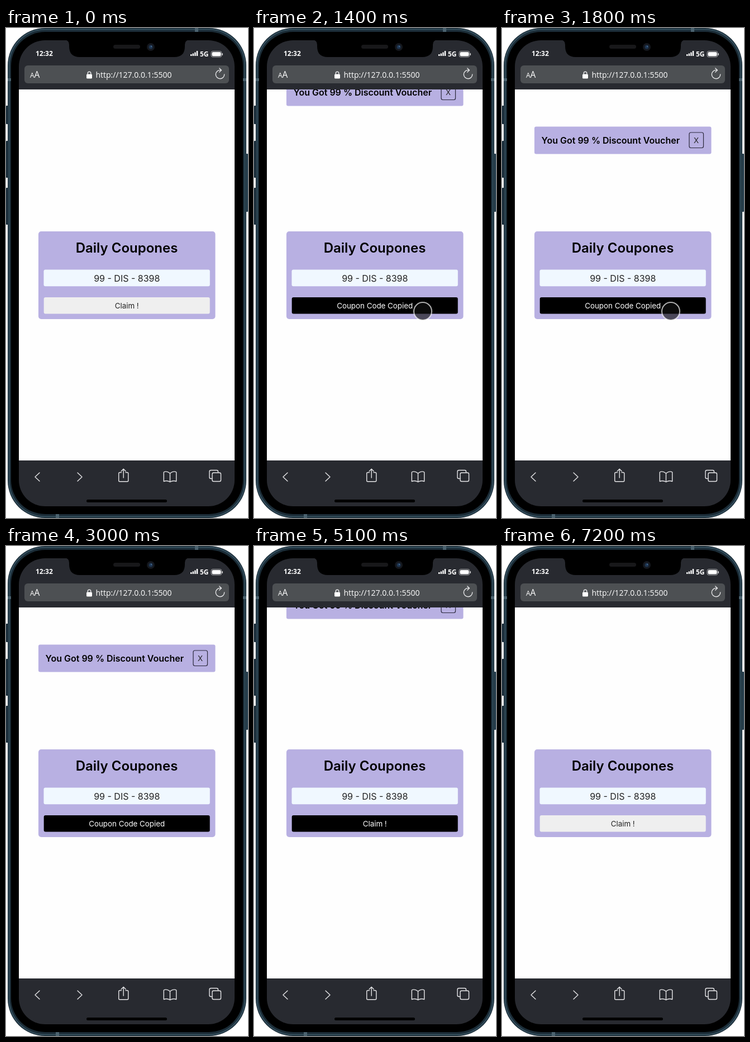
These frames come from a looping animation (433x877 px, 8500 ms). An HTML page:

```html
<!DOCTYPE html>
<html lang="en">
<head>
<meta charset="utf-8">
<title>Daily coupons</title>
<style>
  html, body { margin: 0; width: 100%; height: 100%; overflow: hidden; background: #fff; }
  svg { display: block; width: 433px; height: 877px; }
  .ui { font: 13.333px Inter, sans-serif; text-anchor: middle; }
  .ui .mid { font-size: 16px; }
  .ui .big { font-size: 24px; }
  .sys { font: 14px "Open Sans", "Noto Sans", sans-serif; fill: #fff; }
  .bold { font-size: 12px; font-weight: 700; }
  .line { fill: none; stroke: #e6e6e8; stroke-width: 1.4; stroke-linecap: round; stroke-linejoin: round; }
</style>
</head>
<body>
<svg viewBox="0 0 433 877">
  <defs>
    <clipPath id="page"><rect x="23" y="110" width="386" height="664"/></clipPath>
    <clipPath id="screen"><rect x="23" y="22" width="386" height="834" rx="47"/></clipPath>
  </defs>

  <!-- phone body -->
  <g fill="#1d303d">
    <rect y="139" width="6" height="33" rx="1"/>
    <rect y="202" width="6" height="66" rx="1"/>
    <rect y="286" width="6" height="66" rx="1"/>
    <rect x="427" y="225" width="6" height="104" rx="1" fill="#2b4352"/>
  </g>
  <rect x="3" width="427" height="877" rx="67" fill="#1b2c37"/>
  <rect x="5.5" y="2.5" width="422" height="872" rx="64.5" fill="none" stroke="#35505f" stroke-width="2"/>
  <g fill="#4b626f">
    <rect x="338" width="6" height="7"/>
    <rect x="89" y="870" width="6" height="7"/>
    <rect x="3" y="90" width="6" height="5"/>
    <rect x="424" y="90" width="6" height="5"/>
  </g>
  <rect x="9" y="7" width="415" height="863" rx="61"/>

  <!-- browser -->
  <g clip-path="url(#screen)">
    <rect x="23" y="22" width="386" height="834" fill="#282a30"/>
    <rect x="23" y="110" width="386" height="664" fill="#fefefe"/>
  </g>
  <path d="M105 21Q113 22 113 30V33Q113 52 132 52H301Q320 52 320 33V30Q320 22 328 21Z"/>
  <rect x="192" y="30" width="48" height="7" rx="3.5" fill="#18181a"/>
  <circle cx="259" cy="34" r="7" fill="#15181e"/>
  <circle cx="259" cy="34" r="3.5" fill="#1d3450"/>
  <circle cx="260" cy="33" r="1.2" fill="#47688a"/>

  <text class="sys bold" x="53" y="50">12:32</text>
  <text class="sys bold" x="347" y="51">5G</text>
  <g fill="#fff">
    <rect x="330" y="47" width="2.4" height="3"/>
    <rect x="333.6" y="45.5" width="2.4" height="4.5"/>
    <rect x="337.2" y="43.5" width="2.4" height="6.5"/>
    <rect x="340.8" y="41" width="2.4" height="9"/>
    <rect x="368.5" y="43" width="16" height="7.5" rx="2"/>
    <rect x="386.3" y="45" width="1.4" height="4" rx=".7"/>
  </g>
  <rect x="367" y="41.5" width="18.8" height="10.5" rx="3" fill="none" stroke="#a4a5a8"/>

  <rect x="33" y="67" width="366" height="32" rx="6" fill="#4d5053"/>
  <text class="sys" x="43" y="89"><tspan style="font-size:12px">A</tspan><tspan style="font-size:15.5px">A</tspan></text>
  <rect x="144" y="82.5" width="10" height="8" rx="1.5" fill="#fff"/>
  <path class="line" d="M146.2 83V81a2.8 2.8 0 0 1 5.6 0V83"/>
  <text class="sys" x="160.5" y="89">http://127.0.0.1:5500</text>
  <path class="line" d="M390.7 83a7.7 7.7 0 1 1 -7.7 -7.6H385.5M381.7 72L385.5 75.4L381.7 79"/>

  <!-- page -->
  <g class="ui" clip-path="url(#page)">
    <g id="banner">
      <rect x="58" y=".5" width="316.5" height="49" rx="3" fill="#b8b0e2"/>
      <text class="mid" x="194.3" y="30.5" font-weight="600">You Got 99 % Discount Voucher</text>
      <rect x="335" y="11" width="25.5" height="27.5" rx="3" fill="none" stroke="#29273a" stroke-width="1.2"/>
      <text x="347.5" y="29.5" fill="#222">X</text>
    </g>
    <rect x="58" y="364" width="316.5" height="157" rx="5" fill="#b8b0e2"/>
    <text class="big" x="216" y="401.5" font-weight="600">Daily Coupones</text>
    <rect x="67.5" y="432.5" width="297.3" height="29.7" rx="3" fill="#f0f8ff"/>
    <text class="mid" x="216.3" y="453.7" fill="#222">99 - DIS - 8398</text>
    <rect id="button" x="67.7" y="482" width="297" height="29.6" rx="3"/>
    <text id="label" x="216.2" y="501.7"></text>
    <circle id="touch" r="16" fill="#111" fill-opacity=".65" stroke="#fff" stroke-opacity=".68" stroke-width="2"/>
  </g>

  <!-- toolbar -->
  <g class="line">
    <path d="M60 796L52 803.5L60 811M128 796L136 803.5L128 811"/>
    <path d="M206.5 795.5H203.5Q201.7 795.5 201.7 797.3V810Q201.7 811.8 203.5 811.8H217Q218.8 811.8 218.8 810V797.3Q218.8 795.5 217 795.5H214M210.2 805V789.5M206.2 793.3L210.2 789.3L214.2 793.3"/>
    <path d="M293.5 797Q287 792 282.3 795V811.5Q288 809 293.5 812.5Q299 809 304.7 811.5V795Q300 792 293.5 797V812"/>
    <rect x="369" y="796" width="15.5" height="15.5" rx="2.5"/>
    <path d="M368.5 806.5H366.5Q364 806.5 364 804V794Q364 791.5 366.5 791.5H377Q379.5 791.5 379.5 794V795.5"/>
  </g>
  <rect x="144" y="844" width="144" height="5" rx="2.5"/>
</svg>

<script>
const LOOP = 8500, STEP = 100;
const HIDDEN = 58, SHOWN = 176;
const [banner, button, label, touch] =
  ["banner", "button", "label", "touch"].map(id => document.getElementById(id));

// cubic-bezier(.25, .1, .25, 1)
function ease(p) {
  if (p <= 0) return 0;
  if (p >= 1) return 1;
  const bezier = (a, b, u) => 3 * a * u * (1 - u) ** 2 + 3 * b * u * u * (1 - u) + u ** 3;
  let lo = 0, hi = 1;
  for (let i = 0; i < 20; i++) {
    const mid = (lo + hi) / 2;
    if (bezier(.25, .25, mid) < p) lo = mid; else hi = mid;
  }
  return bezier(.1, 1, lo);
}

function draw(time) {
  const t = Math.floor(time / STEP) * STEP;
  const drop = ease((t - 1300) / 530) - ease((t - 5000) / 200);
  const y = Math.round(HIDDEN + (SHOWN - HIDDEN) * drop);
  banner.setAttribute("transform", `translate(0 ${y})`);

  const active = t >= 1000 && t < 7200;
  button.setAttribute("fill", active ? "#000" : "#efefef");
  label.setAttribute("fill", active ? "#fff" : "#222");
  label.textContent = t >= 1000 && t < 5000 ? "Coupon Code Copied" : "Claim !";

  const away = 1 - ease((t - 400) / 300);
  touch.setAttribute("visibility", t >= 500 && t < 3000 ? "visible" : "hidden");
  touch.setAttribute("cx", 302 + 40 * away);
  touch.setAttribute("cy", 507 + 50 * away);
}

const start = performance.now();
function tick() {
  draw((performance.now() - start) % LOOP);
  requestAnimationFrame(tick);
}
tick();
</script>
</body>
</html>
```
